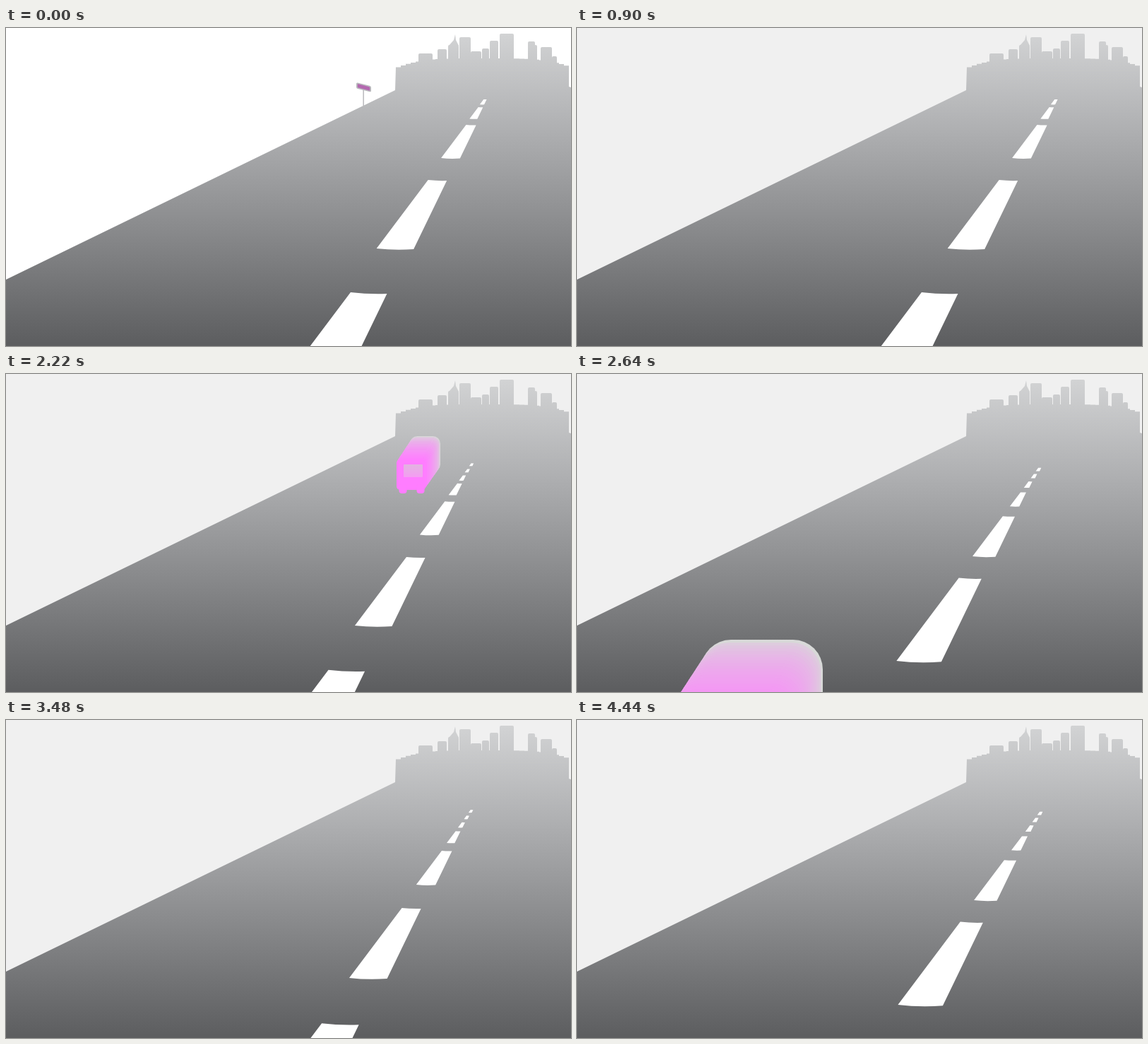
An HTML page with a canvas for the animation above (4500 ms loop, 800 px wide and 450 px high).

```html
<!DOCTYPE html>
<html lang="en">
<head>
<meta charset="utf-8">
<title>Road</title>
<style>
html, body { margin: 0; width: 100%; height: 100%; overflow: hidden; background: #f0f0f0; }
canvas { display: block; width: 800px; height: 450px; }
</style>
</head>
<body>
<canvas id="stage" width="800" height="450"></canvas>
<script>
const ctx = document.getElementById('stage').getContext('2d');
const LOOP = 4500, STEP = 60, CYCLE = 5;

const mix = (a, b, p) => a + (b - a) * p;

function fade(y0, y1, ...colors) {
  const g = ctx.createLinearGradient(0, y0, 0, y1);
  colors.forEach((c, i) => g.addColorStop(i / (colors.length - 1), c));
  return g;
}

const roadFill = fade(0, 450, '#d4d5d6', '#adaeb0', '#858688', '#5c5d5f');

// Towers of the city: left, width, top.
const towers = [
  [584, 20, 36], [611, 13, 30], [626, 15, 24], [642, 16, 13], [658, 15, 33], [674, 10, 29],
  [685, 12, 18], [699, 20, 8], [739, 10, 19], [748, 4, 24], [757, 16, 27], [773, 7, 40]
];

// Dashes near to far: top edge, size.
const dashes = [
  [374, 2.04], [215, 1], [137, .485], [112, .17], [101, .075], [92, .05], [84, .04]
];

function fillPoly(pts) {
  ctx.beginPath();
  pts.forEach(([x, y]) => ctx.lineTo(x, y));
  ctx.closePath();
  ctx.fill();
}

function fillBox(x, y, w, h, r) {
  ctx.beginPath();
  ctx.roundRect(x, y, w, h, r);
  ctx.fill();
}

function zoom(x, y, s, draw) {
  ctx.save();
  ctx.translate(x, y);
  ctx.scale(s, s);
  ctx.translate(-x, -y);
  draw();
  ctx.restore();
}

function drawRoad() {
  ctx.fillStyle = roadFill;
  const outline = [[800, 84], [800, 450], [0, 450], [0, 356], [551, 88]];
  for (let x = 552; x < 797; x += 7) {
    const y = 43 + 13 * ((x - 674) / 123) ** 4;
    outline.push([x, y], [x + 7, y]);
  }
  outline.push([797, 83]);
  fillPoly(outline);
  for (const [x, w, top] of towers) fillBox(x, top, w, 60 - top, [2, 2, 0, 0]);
  fillPoly([[627, 25], [634, 17], [636, 9], [637, 17], [641, 25]]);
}

// The row slides down with an ease-out while a late surge spreads and enlarges it.
function drawDashes(t) {
  const u = t / STEP % CYCLE / (CYCLE - 1);
  const slide = (47 - t / 600) * (1 - (1 - u) ** 5);
  const surge = u ** 4;
  const grow = 1 + .21 * surge ** 2;
  ctx.fillStyle = '#fff';
  for (const [top, size] of dashes) {
    const spread = 31 * surge * Math.sqrt(size);
    const y = top + slide + spread;
    if (y < 100) continue;
    const w = 24 * size + 2.5, h = 98 * size, left = -73 * size, right = left + 50 * size + 2.5;
    ctx.save();
    ctx.translate(746 - .69 * y - .2 * spread, y);
    ctx.scale(grow, grow);
    ctx.beginPath();
    ctx.moveTo(0, 0);
    ctx.quadraticCurveTo(w / 2, 1.5 * size, w, size);
    ctx.lineTo(right, h);
    ctx.quadraticCurveTo((left + right) / 2, h + 2 * size, left, h - size);
    ctx.fill();
    ctx.restore();
  }
}

function drawSign() {
  ctx.fillStyle = '#b9b9bd';
  ctx.fillRect(505.4, 86, 1.5, 24);
  ctx.transform(1, .25, 0, 1, 496, 77);
  fillBox(0, 0, 21, 8.5, 2);
  ctx.fillStyle = '#b368b0';
  fillBox(1.8, 1.6, 17.4, 5.3, 1);
}

function drawVan() {
  const layers = 32;
  for (let i = 0; i <= layers; i++) {
    const p = i / layers, q = p ** .55;
    ctx.fillStyle = `rgb(${mix(216, 255, q)},${mix(217, 125, q)},${mix(216, 255, q)})`;
    fillBox(mix(572, 553, p), mix(88, 121, p), mix(43, 41, p), mix(50, 43, p), mix(10.5, 5, p));
  }
  for (const x of [556.5, 581.5]) fillBox(x, 156, 11, 13, 4);
  ctx.fillStyle = fade(128, 147, '#e2b4e0', '#f59bf3');
  fillBox(563, 128, 27, 18, 1);
}

function render(t) {
  ctx.fillStyle = t < STEP ? '#fff' : '#f0f0f0';
  ctx.fillRect(0, 0, 800, 450);
  drawRoad();
  drawDashes(t);
  if (t < 540) zoom(807, -36, 1 + 2 * (t / 480) ** 2, drawSign);
  if (t > 1980 && t < 2760) {
    const s = ((t - 1800) / 420) ** 2;
    ctx.globalAlpha = Math.min(1, Math.max(0, (s - .2) / .5));
    zoom(704, -8, s, drawVan);
    ctx.globalAlpha = 1;
  }
}

const start = performance.now();
function tick() {
  const t = (performance.now() - start) % LOOP;
  render(Math.floor(t / STEP) * STEP);
  requestAnimationFrame(tick);
}
tick();
</script>
</body>
</html>
```
